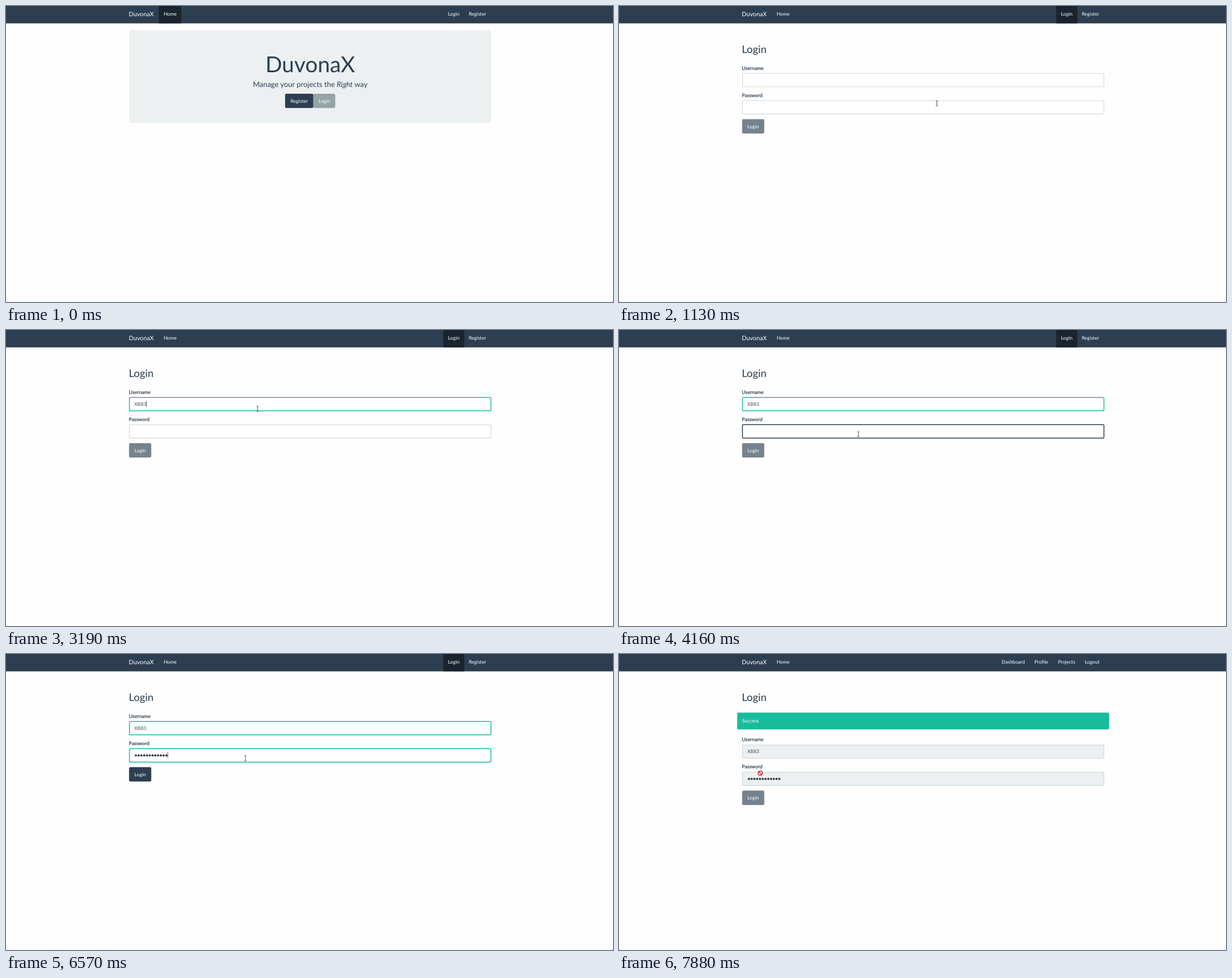
Write an HTML page that moves like this. It is 1070 by 523 pixels and loops after 8000 ms.

```html
<!DOCTYPE html>
<html lang="en">
<head>
<meta charset="utf-8">
<title>Sign in</title>
<style>
html, body { margin: 0; width: 100%; height: 100%; overflow: hidden; background: #fefefe; }
svg { position: fixed; left: 0; top: 0; width: 1070px; height: 523px; display: block; }
text { font: 8.62px Lato, sans-serif; fill: #2c3e50; text-rendering: geometricPrecision; white-space: pre; }
.light text, text.light { fill: #fff; }
text.brand { font-size: 10.78px; }
text.mid { text-anchor: middle; }
text.title { font-size: 38.8px; }
text.tag { font-size: 12.94px; }
text.h2 { font-size: 18.4px; }
text.label { stroke: #2c3e50; stroke-width: .22px; }
text.value { fill: #495057; }
text.url { font: 6.5px "Open Sans", sans-serif; fill: #b4b6b8; }
.field rect { fill: #fff; }
.dots { fill: #2b3542; }
.caret { fill: #333c46; }
.hide { display: none; }
</style>
</head>
<body>
<svg viewBox="0 0 1070 523">
  <rect width="1070" height="30.7" fill="#2c3e50"/>
  <rect id="active" height="30.7" fill="#1a242f"/>
  <g class="light">
    <text class="brand" x="216.6" y="18">DuvonaX</text>
    <text x="277.9" y="17.3">Home</text>
    <g id="guestNav">
      <text x="779" y="17.3">Login</text>
      <text x="815.7" y="17.3">Register</text>
    </g>
    <g id="userNav">
      <text x="674.6" y="17.3">Dashboard</text>
      <text x="732.2" y="17.3">Profile</text>
      <text x="773.7" y="17.3">Projects</text>
      <text x="821" y="17.3">Logout</text>
    </g>
  </g>

  <g id="home">
    <rect x="217" y="42.4" width="638.4" height="164.6" rx="4.5" fill="#ecf0f1"/>
    <text class="mid title" x="536.2" y="117">DuvonaX</text>
    <text class="mid tag" x="536.2" y="142.8">Manage your projects the <tspan font-style="italic">Right</tspan> way</text>
    <rect x="492" y="155" width="49.8" height="25.2" rx="2.3" fill="#2c3e50"/>
    <rect id="homeBtn" x="542.3" y="155.5" width="37.6" height="24.3" rx="2"/>
    <text class="mid light" x="516.8" y="170.8">Register</text>
    <text class="mid light" x="561.1" y="170.8">Login</text>
    <g id="status">
      <path d="M0 512.5H60.5Q62 512.5 62 514V523H0Z" fill="#2d2f32"/>
      <text class="url" x="0" y="520.6">testlabel:3700/login</text>
    </g>
  </g>

  <g id="login">
    <text class="h2" x="216.6" y="82.7">Login</text>
    <g id="alert">
      <rect x="208.3" y="103.6" width="655.6" height="29.6" rx="2.3" fill="#18bc9c"/>
      <text class="light" x="217" y="121.4">Success</text>
    </g>
    <g id="form">
      <text class="label" x="216.6" y="112.5">Username</text>
      <g class="field"><rect id="userBox" x="217.6" y="119.2" width="637.2" height="23.6" rx="1.8"/></g>
      <text class="value" id="user" x="226" y="133.8"></text>
      <text class="label" x="216.6" y="160.6">Password</text>
      <g class="field"><rect id="passBox" x="217.6" y="167.3" width="637.2" height="23.6" rx="1.8"/></g>
      <g id="dots" class="dots"></g>
      <rect id="caret" class="caret" width=".8" height="10.6"/>
      <rect id="submit" x="217.3" y="200.3" width="38.4" height="24.6" rx="2"/>
      <text class="mid light" x="236.4" y="215.6">Login</text>
    </g>
  </g>

  <g id="cursor">
    <circle id="glow" r="6.5" fill="#ff0" fill-opacity=".57"/>
    <path id="arrow" d="M0 0V10.2L2.4 8L4 11.7L5.6 11L4 7.4H7.2Z" fill="#fff" stroke="#000" stroke-width=".7"/>
    <path id="hand" d="M-.9 .2Q0 -.9 .9 .2V4.2Q2 3.5 2.6 4.5Q3.8 4 4.3 5Q5.6 4.7 5.9 6V8.6Q5.8 10.3 4.9 12H.3Q-.8 9.8 -2.6 7.6Q-2.6 6.2 -.9 7.1Z" fill="#fff" stroke="#000" stroke-width=".75"/>
    <path id="beam" d="M-1.9 -4.3H-.5L0 -3.9L.5 -4.3H1.9M0 -3.9V3.9M-1.9 4.3H-.5L0 3.9L.5 4.3H1.9" fill="none" stroke="#222" stroke-width=".8"/>
    <g id="denied" stroke="#d0141c" stroke-width="1.5" fill="#fff"><circle r="3.8"/><path d="M-2.7 -2.7L2.7 2.7"/></g>
  </g>
</svg>
<script>
const LOOP = 8000;
const $ = id => document.getElementById(id);
const show = (id, on) => $(id).classList.toggle('hide', !on);
const set = (id, attrs) => { for (const k in attrs) $(id).setAttribute(k, attrs[k]); };
const clamp = v => Math.max(0, Math.min(1, v));
const rgb = hex => [1, 3, 5].map(i => parseInt(hex.slice(i, i + 2), 16));

// Colour that eases to each [time, colour] in turn.
function fade(t, start, ...steps) {
  let c = rgb(start);
  for (const [at, hex, dur = 150] of steps) {
    const p = clamp((t - at) / dur), k = p * (2 - p), to = rgb(hex);
    c = c.map((v, i) => v + (to[i] - v) * k);
  }
  return `rgb(${c.map(Math.round)})`;
}

const easeOut = p => p * (2 - p);
const easeBoth = p => p * p * (3 - 2 * p);
const moves = [
  [110, 900, 962, 519, 568.5, 174.5, easeOut],
  [1060, 1510, 568.5, 174.5, 445.7, 138.4, easeBoth],
  [1800, 1810, 445.7, 138.4, 443.6, 138.4, easeBoth],
  [3160, 3620, 443.6, 138.4, 422, 184.2, easeBoth],
  [6770, 7450, 422, 184.2, 249, 210.5, easeBoth]
];
const clicks = [[900, 1040], [1530, 1630], [3630, 3730], [7500, 7640]];
const userKeys = [2300, 2400, 2810, 2860];
const passKeys = [4490, 4680, 4860, 5040, 5240, 5320, 5500, 5650, 5780, 6060, 6160, 6570];
const HOVER = 800, OPEN = 1050, USER = 1560, PASS = 3650, AIM = 7280, SEND = 7650, DONE = 7750;
const name = 'XB83', dotStep = 4.88, shift = 41.5;
const typed = (keys, t) => keys.filter(k => k <= t).length;
const inside = (x, y, l, t, r, b) => x > l && x < r && y > t && y < b;

passKeys.forEach((_, i) => {
  const dot = document.createElementNS('http://www.w3.org/2000/svg', 'circle');
  dot.setAttribute('cx', 229 + i * dotStep);
  dot.setAttribute('cy', 179.2);
  dot.setAttribute('r', 1.9);
  $('dots').append(dot);
});

function cursorAt(t) {
  const m = moves.filter(v => v[0] <= t).pop() || moves[0];
  const k = m[6](clamp((t - m[0]) / (m[1] - m[0])));
  return [m[2] + (m[4] - m[2]) * k, m[3] + (m[5] - m[3]) * k];
}

function cursorKind(t, x, y) {
  if (t < OPEN) return inside(x, y, 492, 155, 580, 180.5) ? 'hand' : 'arrow';
  if (t >= DONE) return 'denied';
  if (t < SEND && inside(x, y, 217, 200, 256, 225)) return 'hand';
  return inside(x, y, 217, 118, 855, 143.5) || inside(x, y, 217, 166, 855, 191.5) ? 'beam' : 'arrow';
}

function drawCaret(t) {
  const inPass = t >= PASS;
  const last = [USER, PASS, ...userKeys, ...passKeys].filter(k => k <= t).reduce((a, b) => Math.max(a, b), 0);
  const lit = Math.floor((t - last) / 510) % 2 === 0;
  show('caret', t >= USER && t < 7500 && lit);
  const x = inPass ? 226.2 + typed(passKeys, t) * dotStep
                   : 226.2 + (typed(userKeys, t) ? $('user').getComputedTextLength() : 0);
  set('caret', { x, y: inPass ? 173.4 : 125.3 });
}

function drawFields(t) {
  const off = [SEND, '#ecf0f1'], line = [SEND, '#c9d6dc'];
  const thin = t >= SEND ? 1.1 : 1.5;
  set('userBox', {
    stroke: fade(t, '#ced8df', [USER, '#2c3e50'], [userKeys[0], '#18bc9c'], line),
    'stroke-width': t < USER ? 1.1 : thin
  });
  set('passBox', {
    stroke: fade(t, '#ced8df', [PASS, '#2c3e50'], [passKeys[0], '#18bc9c'], line),
    'stroke-width': t < PASS ? 1.1 : thin
  });
  for (const id of ['userBox', 'passBox']) $(id).style.fill = fade(t, '#ffffff', off);
  $('user').textContent = name.slice(0, typed(userKeys, t));
  const count = typed(passKeys, t);
  [...$('dots').children].forEach((d, i) => d.classList.toggle('hide', i >= count));
  const btn = [[passKeys[0], '#2c3e50'], [AIM, '#1a252f'], [7490, '#0e1419', 60], [SEND, '#76828d']];
  set('submit', {
    fill: fade(t, '#76828d', ...btn),
    stroke: fade(t, '#76828d', btn[0], btn[1], [7490, '#27476b', 60], btn[3]),
    'stroke-width': .8
  });
}

function draw(t) {
  const home = t < OPEN, done = t >= DONE;
  show('home', home);
  show('login', !home);
  show('active', !done);
  set('active', home ? { x: 269.5, width: 39.3 } : { x: 770.8, width: 37.1 });
  show('guestNav', !done);
  show('userNav', done);
  show('alert', done);
  set('form', { transform: `translate(0 ${done ? shift : 0})` });

  show('status', t >= HOVER);
  set('homeBtn', {
    fill: fade(t, '#95a5a6', [HOVER, '#798d8f'], [900, '#697b7d', 60]),
    stroke: fade(t, '#95a5a6', [HOVER, '#74898a'], [900, '#566a6d', 60])
  });
  drawFields(t);
  drawCaret(t);

  const [x, y] = cursorAt(t), kind = cursorKind(t, x, y);
  show('cursor', t >= 110);
  set('cursor', { transform: `translate(${x} ${y})` });
  for (const id of ['arrow', 'hand', 'beam', 'denied']) show(id, id === kind);
  show('glow', clicks.some(([a, b]) => t >= a && t < b));
}

const begin = performance.now();
function tick() {
  draw((performance.now() - begin) % LOOP);
  requestAnimationFrame(tick);
}
tick();
</script>
</body>
</html>
```
